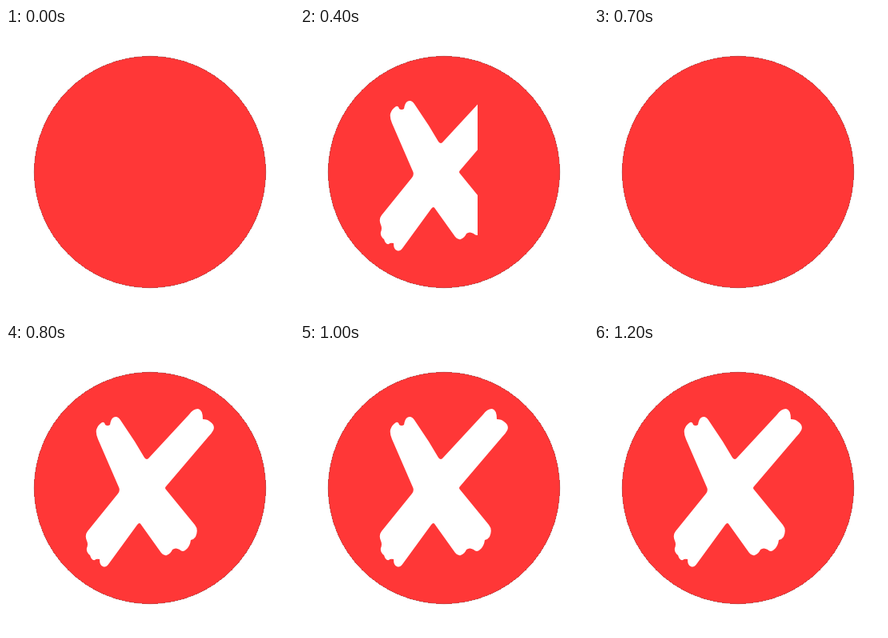
An HTML page for the animation above (1700 ms loop, 360 px wide and 360 px high).

```html
<!DOCTYPE html>
<html lang="en">
<head>
<meta charset="utf-8">
<style>
  html, body { margin: 0; width: 100%; height: 100%; overflow: hidden; background: #fff; }
  svg { display: block; width: 100%; height: 100%; }
</style>
</head>
<body>
<svg viewBox="0 0 360 360">
  <clipPath id="wipe"><rect id="reveal" height="360"/></clipPath>
  <circle cx="180" cy="180" r="145" fill="#ff3737" shape-rendering="crispEdges"/>
  <circle cx="180" cy="180" r="144.8" fill="none" stroke="#655" stroke-opacity=".6" stroke-width=".6"/>
  <path id="cross" clip-path="url(#wipe)" fill="#fff" d="
    M115 119 Q112 112 113 107 Q115 101 120 98 Q123 97 124 101 Q127 103 130 101
    Q131 94 134 92 Q139 89 143 95 L161 122 L173 142 Q176 146 179 142
    L229 88 Q234 81 240 81 Q246 82 246 94 Q252 94 255 97 Q262 102 259 108
    Q257 112 252 117 L200 178 Q198 180 200 182
    L236 226 Q241 232 237 241 Q235 244 231 245 Q230 253 225 257 Q221 261 217 257
    Q212 254 208 257 Q206 262 201 264 Q197 265 194 261
    L169 226 Q167 222 164 226 L129 274 Q125 280 121 278 Q117 277 117 269
    Q113 268 111 270 Q107 271 105 264 Q100 260 101 255 Q103 250 101 246
    Q98 239 102 234 L140 187 Q143 183 141 179 Z"/>
</svg>
<script>
  const LOOP = 1700, STEP = 100;
  const cross = document.getElementById('cross');
  const reveal = document.getElementById('reveal');

  function draw(now) {
    const step = Math.floor(now % LOOP / STEP);
    // Wipe in from the left, blink three times, then hold.
    const wiping = step < 6;
    const shown = wiping ? step > 0 : step >= 12 || step % 2 === 0;
    reveal.setAttribute('width', wiping ? 100 + 30.5 * step : 360);
    cross.setAttribute('visibility', shown ? 'visible' : 'hidden');
  }

  const start = performance.now();
  function tick() {
    draw(performance.now() - start);
    requestAnimationFrame(tick);
  }
  tick();
</script>
</body>
</html>
```
